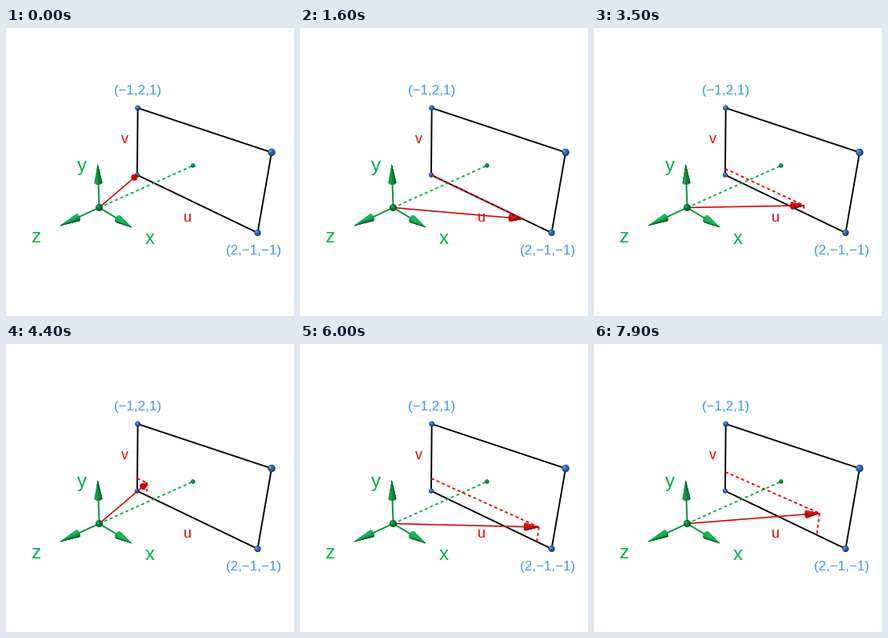
A matplotlib script that plays this animation: 360x360 px, repeating every 8 s.

```python
import numpy as np
import matplotlib.pyplot as plt
from matplotlib.animation import FuncAnimation
from matplotlib.collections import PolyCollection
from matplotlib.patches import Circle

SIZE, FRAMES, INTERVAL = 360, 80, 100
PX = 0.72                       # points per pixel at 100 dpi
FOCAL, MID = 600, 180
ORIGIN = (116.5, 224.5)
GREEN, RED, BLUE = "#00b048", "#f00000", "#4096f8"
LIGHT = np.array([-0.35, -0.75, -0.56])     # x right, y down, z away

# Corners of the window: (0,0), (1,0), (1,1), (0,1)
CORNERS = np.array([(164, 183.7), (314.5, 256), (332, 155.5), (164.7, 100)])
ORIGIN_DEPTH = 0.77             # relative to corner (0,0)


def square_map(c):
    """Perspective map of the unit square onto four screen points."""
    d1, d2 = c[1] - c[2], c[3] - c[2]
    g, h = np.linalg.solve(np.column_stack([d1, d2]), c[0] - c[1] + c[2] - c[3])
    a, b = c[1] - c[0] + g * c[1], c[3] - c[0] + h * c[3]
    return np.array([[a[0], b[0], c[0][0]], [a[1], b[1], c[0][1]], [g, h, 1]])


MAP = square_map(CORNERS)


def on_window(u, v):
    x, y, w = MAP @ (u, v, 1)
    return x / w, y / w, FOCAL * (w / ORIGIN_DEPTH - 1)


def lift(x, y, z):
    """Screen position at depth z to camera space."""
    k = (FOCAL + z) / FOCAL
    return np.array([(x - MID) * k, (y - MID) * k, FOCAL + z])


def project(p):
    p = np.asarray(p)
    return MID + FOCAL * p[..., :2] / p[..., 2:]


START = lift(*ORIGIN, 0)


def cone_faces(tip, length, radius, color, sides=28):
    """Visible shaded faces of an arrow head, and its base centre on screen."""
    axis = (tip - START) / np.linalg.norm(tip - START)
    base = tip - length * axis
    e1 = np.cross(axis, (0, 1, 0.2))
    e1 /= np.linalg.norm(e1)
    e2 = np.cross(axis, e1)
    t = np.linspace(0, 2 * np.pi, sides + 1)[:, None]
    ring = base + radius * (np.cos(t) * e1 + np.sin(t) * e2)
    tm = (t[:-1] + t[1:]) / 2
    normals = np.cos(tm) * e1 + np.sin(tm) * e2 + axis * radius / length
    normals /= np.linalg.norm(normals, axis=1)[:, None]

    faces, shades = [], []

    def add(points, normal):
        if normal @ points[0] < 0:
            faces.append(project(points))
            k = np.clip(0.62 + 0.45 * (normal @ LIGHT), 0.4, 1)
            shades.append(np.array(color) * k)

    for i, n in enumerate(normals):
        add(np.array([ring[i], ring[i + 1], tip]), n)
    add(ring[:-1], -axis)
    return faces, shades, project(base)


fig = plt.figure(figsize=(SIZE / 100, SIZE / 100), dpi=100, facecolor="white")
ax = fig.add_axes([0, 0, 1, 1])
ax.set(xlim=(0, SIZE), ylim=(SIZE, 0))
ax.axis("off")


def line(pts, color, width, z, dash=None):
    xs, ys = zip(*pts) if len(pts) else ((), ())
    style = (0, dash) if dash else "-"
    return ax.plot(xs, ys, color=color, lw=width * PX, ls=style, zorder=z,
                   dash_capstyle="butt", solid_capstyle="butt")[0]


def ball(x, y, r, dark, mid, light, z):
    for k, shift, c in ((1, 0, dark), (0.76, 0.16, mid), (0.36, 0.34, light)):
        ax.add_patch(Circle((x - shift * r, y - shift * r), k * r,
                            fc=c, ec="none", zorder=z))


def label(x, y, text, size, color):
    ax.text(x, y, text, fontsize=size * PX, color=color, zorder=12,
            family="Liberation Sans", ha="center", va="baseline")


# Window
line(list(CORNERS) + [CORNERS[0]], "black", 1.9, 2)
for (x, y), r in zip(CORNERS, (3.1, 4.1, 4.7, 3.4)):
    ball(x, y, r, "#1d3f78", "#2f66b8", "#5a93e0", 3)

# View axis
CENTER = on_window(0.5, 0.5)[:2]
line([ORIGIN, CENTER], GREEN, 1.9, 4, (2, 1.8))
ball(*CENTER, 2.7, "#006a2c", "#008c3a", "#20b060", 4)

# Coordinate axes
for x, y, z in ((157, 249, -42), (114.7, 171, -33), (68, 247, -34)):
    faces, shades, base = cone_faces(lift(x, y, z), 25, 4.6, (0, 0.72, 0.29))
    line([ORIGIN, base], "#009440", 1.9, 5)
    ax.add_collection(PolyCollection(faces, facecolors=shades,
                                     edgecolors=shades, lw=0.2, zorder=6))
ball(*ORIGIN, 4.5, "#005a26", "#008036", "#20a858", 10)

label(180, 270.5, "x", 24, GREEN)
label(95, 179, "y", 24, GREEN)
label(38, 267.5, "z", 24, GREEN)
label(227, 242, "u", 18, RED)
label(148.7, 144, "v", 18, RED)
label(164.7, 83.5, "(\u22121,2,1)", 17, BLUE)
label(309.5, 283.5, "(2,\u22121,\u22121)", 17, BLUE)

# Moving ray
guide_u = line([], RED, 1.9, 4, (2, 1.8))
guide_v = line([], RED, 1.9, 4, (2, 1.8))
shaft = line([], "#d80000", 1.6, 9)
head = PolyCollection([], lw=0.2, zorder=8)
ax.add_collection(head)


def update(i):
    row, col = divmod(i, 21)
    u, v = col / 20, row / 10
    tip, left, foot = on_window(u, v), on_window(0, v), on_window(u, 0)
    guide_u.set_data(*zip(left[:2], tip[:2]))
    guide_v.set_data(*zip(tip[:2], foot[:2]))
    faces, shades, base = cone_faces(lift(*tip), 18.5, 5, (1, 0, 0))
    head.set_verts(faces)
    head.set_facecolor(shades)
    head.set_edgecolor(shades)
    shaft.set_data(*zip(ORIGIN, base))
    return guide_u, guide_v, shaft, head


anim = FuncAnimation(fig, update, frames=FRAMES, interval=INTERVAL,
                     repeat=True, repeat_delay=0)
plt.show()
```
